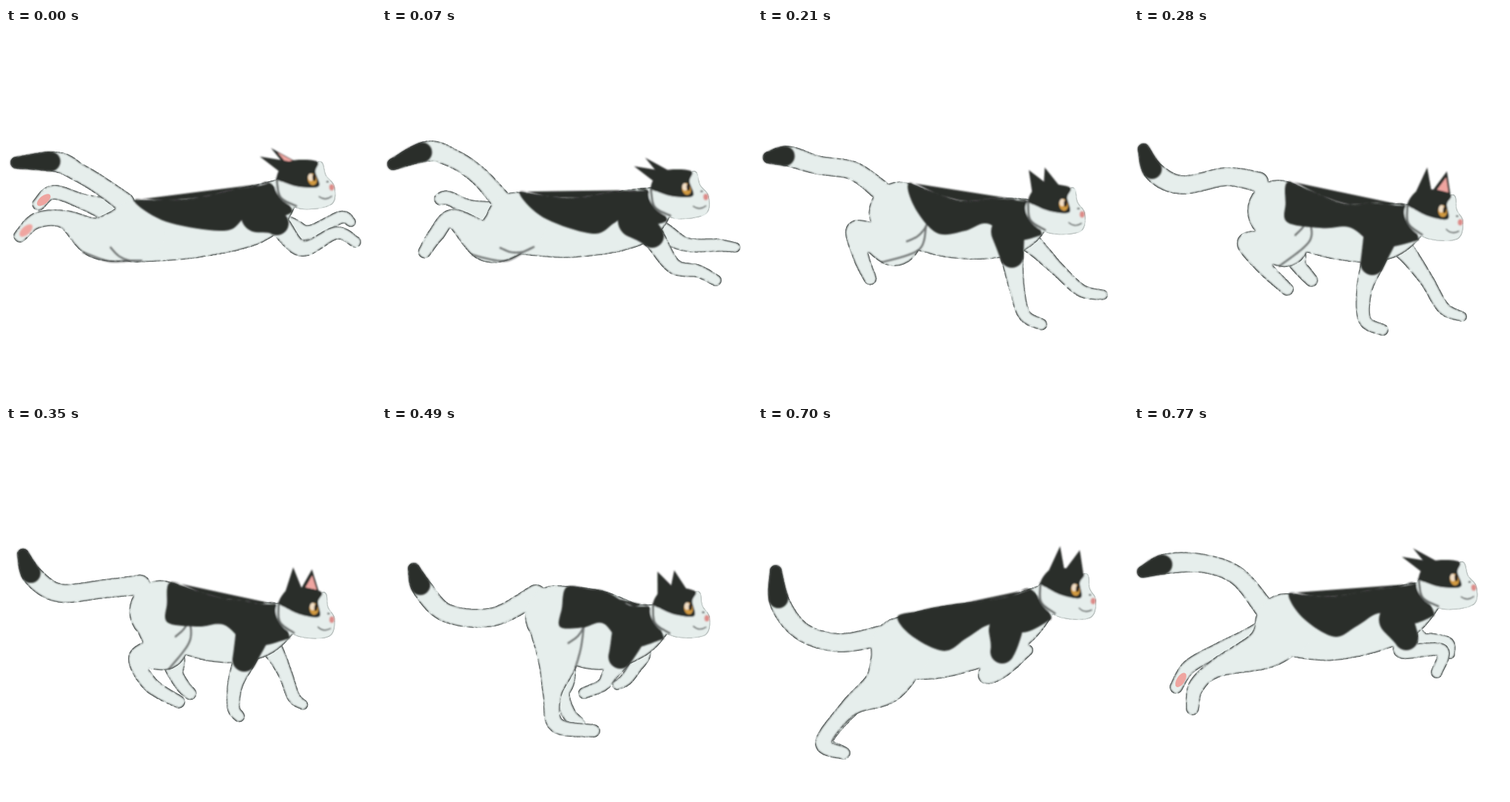
Animation of 500x500 px, one loop 0.84 s. Source, as an HTML page:

```html
<!DOCTYPE html>
<html lang="en">
<head>
<meta charset="utf-8">
<title>Running cat</title>
<style>
  html, body { margin: 0; width: 100%; height: 100%; overflow: hidden; background: #fff; }
  svg { display: block; width: 100vw; height: 100vh; }
  .line { fill: none; stroke: #4a4e4d; stroke-linecap: round; stroke-linejoin: round; }
  .fur { fill: #e6eeec; }
  .dark { fill: #2b2d2c; }
  .pink { fill: #efa5a0; }
</style>
</head>
<body>
<svg id="stage" viewBox="0 0 500 500" xmlns="http://www.w3.org/2000/svg">
  <defs>
    <!-- Shades the inner rim of a shape like a soft pencil line -->
    <filter id="rim" filterUnits="userSpaceOnUse" x="0" y="0" width="500" height="500" color-interpolation-filters="sRGB">
      <feMorphology in="SourceAlpha" operator="erode" radius="1.4"/>
      <feGaussianBlur stdDeviation="1.3" result="core"/>
      <feTurbulence type="fractalNoise" baseFrequency=".13" numOctaves="3" seed="4"/>
      <feColorMatrix values="0 0 0 0 .2  0 0 0 0 .22  0 0 0 0 .215  3 0 0 0 -.6" result="grain"/>
      <feComposite in="grain" in2="SourceAlpha" operator="in"/>
      <feComposite in2="core" operator="out" result="edge"/>
      <feMerge><feMergeNode in="SourceGraphic"/><feMergeNode in="edge"/></feMerge>
    </filter>
    <filter id="soft" filterUnits="userSpaceOnUse" x="0" y="0" width="500" height="500">
      <feGaussianBlur stdDeviation=".8"/>
    </filter>
  </defs>
</svg>
<script>
const STEP = 70, STEPS = 12;

// Joints of the key poses. Spine: hip, waist, shoulder, neck. Legs run from the body to the toe.
const poses = [
  { at: 0, ears: 1, pink: 1, belly: 40, dip: .48, haunch: 1, nose: '444,214',
    spine: '175,275 255,271 335,252 375,224', tail: '160,236 128,213 98,195 68,181 14,182',
    hindN: '125,284 80,259 42,260 19,281', hindF: '140,248 105,235 64,222 44,238',
    foreN: '366,264 400,298 446,277 472,289', foreF: '385,270 410,276 452,256 466,262' },
  { at: 2, ears: 1, pink: 0, belly: 40, dip: .4, haunch: 1, nose: '439,240',
    spine: '188,252 258,270 338,262 375,247', tail: '160,228 132,185 95,158 55,152 16,186',
    hindN: '163,293 112,256 104,298 96,324', hindF: '155,255 130,250 115,238 114,224',
    foreN: '364,298 388,345 408,380 430,393', foreF: '375,283 412,309 455,331 489,331' },
  { at: 4, ears: 0, pink: 1, belly: 38, dip: .09, haunch: 1, nose: '445,262',
    spine: '195,247 275,275 335,275 380,260', tail: '168,208 125,201 65,212 28,195 13,164',
    hindN: '205,295 152,290 175,322 207,353', hindF: '215,300 222,320 232,332 240,341',
    foreN: '322,318 311,355 312,395 336,408', foreF: '365,300 395,340 418,378 443,390' },
  { at: 7, ears: .4, pink: 0, belly: 54, dip: .09, haunch: 1, nose: '443,259',
    spine: '235,257 285,275 335,278 374,262', tail: '208,228 150,258 88,253 55,220 43,193',
    hindN: '238,312 230,362 236,404 286,412', hindF: '245,335 243,362 252,388 266,402',
    foreN: '322,312 308,335 298,350 273,361', foreF: '350,305 342,325 330,342 318,350' },
  { at: 8, ears: 0, pink: 1, belly: 57, dip: .2, haunch: 0, nose: '457,234',
    spine: '196,304 248,288 322,272 384,234', tail: '160,303 105,307 62,285 32,238 13,208',
    hindN: '192,348 178,382 185,412 231,424', hindF: '222,350 213,378 232,412 253,418',
    foreN: '322,328 314,355 298,373 272,383', foreF: '345,305 348,340 338,370 319,392' },
  { at: 10, ears: 0, pink: 0, belly: 48, dip: .33, haunch: 0, nose: '457,236',
    spine: '194,300 250,292 335,270 387,235', tail: '168,283 110,293 60,278 30,240 24,196',
    hindN: '172,348 124,380 88,428 116,442', hindF: '165,345 126,382 92,425 112,440',
    foreN: '330,305 308,337 330,332 364,303', foreF: '350,300 335,322 345,320 362,302' },
  { at: 11, ears: 1, pink: 0, belly: 43, dip: .33, haunch: 0, nose: '463,217',
    spine: '205,268 270,274 350,256 398,230', tail: '175,245 140,203 95,186 45,186 12,197',
    hindN: '178,300 112,327 84,352 79,382', hindF: '160,288 118,302 75,325 57,353',
    foreN: '368,287 364,304 416,303 409,333', foreF: '385,290 405,290 424,294 427,308' }
];

// Half widths at the joints
const girth = {
  tail: [14, 13, 13, 14, 8],
  hind: [40, 28, 13, 11, 9], hindFar: [24, 17, 11, 10, 9],
  fore: [24, 16, 11, 9, 8], foreFar: [20, 14, 10, 9, 7]
};

// Head outline, relative to the nose
const head = {
  face: '-27,-33 -14,-34 -10,-16 0,0 -6,24 -46,27 -74,10 -77,-17',
  cap: '-77,-18 -66,-36 -45,-40 -20,-35 -24,-22 -21,-2 -46,-3 -67,-11',
  neck: '-77,-17 -74,8 -54,22'
};

const points = s => s.split(' ').map(p => p.split(',').map(Number));
const mix = (a, b, k) => a + (b - a) * k;
const mixPts = (a, b, k) => a.map((p, i) => p.map((v, j) => mix(v, b[i][j], k)));

function poseAt(step) {
  const i = poses.findLastIndex(p => p.at <= step);
  const a = poses[i], b = poses[(i + 1) % poses.length];
  const k = (step - a.at) / ((b.at || STEPS) - a.at);
  const out = {};
  for (const key in a) {
    out[key] = typeof a[key] === 'number' ? mix(a[key], b[key], k) : mixPts(points(a[key]), points(b[key]), k);
  }
  return out;
}

// Point on a Catmull-Rom spline, t from 0 to 1, in any number of dimensions
function spline(pts, t) {
  const n = pts.length - 1, i = Math.min(n - 1, Math.floor(t * n)), u = t * n - i;
  const [p, q, r, s] = [-1, 0, 1, 2].map(k => pts[Math.max(0, Math.min(n, i + k))]);
  return q.map((v, j) => v + u / 2 * (r[j] - p[j] +
    u * (2 * p[j] - 5 * v + 4 * r[j] - s[j] + u * (3 * (v - r[j]) + s[j] - p[j]))));
}

function curve(pts, closed) {
  const ring = closed ? [pts.at(-1), ...pts, pts[0], pts[1]] : pts;
  const n = ring.length - 1, [a, b] = closed ? [1 / n, 1 - 1 / n] : [0, 1];
  const steps = pts.length * 10;
  return 'M' + Array.from({ length: steps + 1 }, (_, i) =>
    spline(ring, mix(a, b, i / steps)).map(v => v.toFixed(1))).join('L') + (closed ? 'Z' : '');
}

const poly = pts => 'M' + pts.join('L') + 'Z';
const limb = (joints, widths) => joints.map((p, i) => [...p, widths[i]]);

// A limb is a chain of overlapping discs.
function tube(joints, from = 0, to = 1) {
  let d = '';
  for (let i = 0, n = 90; i <= n; i++) {
    const [x, y, r] = spline(joints, mix(from, to, i / n)).map(v => +v.toFixed(1));
    d += `M${x - r},${y}a${r},${r} 0 1 1 ${2 * r},0a${r},${r} 0 1 1 ${-2 * r},0`;
  }
  return d;
}

// Point beside a limb: t along it, s half widths to its left, turned by angle about the joint
function beside(joints, t, s, angle = 0) {
  const [x, y, r] = spline(joints, t);
  const a = spline(joints, Math.max(0, t - .01)), b = spline(joints, Math.min(1, t + .01));
  const dir = Math.atan2(b[1] - a[1], b[0] - a[0]) - Math.PI / 2 - angle;
  return [x + Math.cos(dir) * r * s, y + Math.sin(dir) * r * s];
}

const path = (d, cls, more = '') => `<path class="${cls}" d="${d}" ${more}/>`;
const group = (filter, html) => `<g filter="url(#${filter})">${html}</g>`;
const furry = (...shapes) => group('rim', shapes.map(d => path(d, 'fur')).join(''));
const oval = (x, y, rx, ry, fill, turn = 0) =>
  `<ellipse cx="${x}" cy="${y}" rx="${rx}" ry="${ry}" fill="${fill}" transform="rotate(${turn} ${x} ${y})"/>`;

// Dark saddle: follows the back, dips over the flank, rises, then falls over the shoulder.
function saddle(body, dip) {
  const rise = .35 + dip * .75;
  const top = Array.from({ length: 20 }, (_, i) => beside(body, i / 20, 1.01));
  const under = [[.95, 1], [.95, -.9], [.88, -.95], [mix(rise, .93, .4), -.5], [rise, .2],
    [mix(dip, rise, .5), -.02], [dip, -.25], [dip * .4, .3], [0, 1]].map(([t, s]) => beside(body, t, s));
  return poly(top) + curve([...under, ...top.slice(1, 19).filter((_, i) => i % 4 === 3)], true);
}

// The sole shows when a foot trails far behind the hip.
function pad(leg) {
  const [hip, , , heel, toe] = leg;
  if (hip[0] - toe[0] < 129) return '';
  const turn = Math.atan2(toe[1] - heel[1], toe[0] - heel[0]) * 180 / Math.PI;
  return oval(mix(heel[0], toe[0], .65), mix(heel[1], toe[1], .65), 11, 5.5, '#efa5a0', turn);
}

function ears({ ears: back, pink }) {
  const rear = [[mix(-55, -97, back), mix(-69, -49, back)], [-46, -36], [-71, -25]];
  const front = [[mix(-28, -81, back), mix(-66, -59, back)], [mix(-20, -42, back), -33], [mix(-46, -66, back), -37]];
  const [cx, cy] = [0, 1].map(j => (front[0][j] + front[1][j] + front[2][j]) / 3);
  const inner = front.map(([x, y]) => [mix(cx, x, .6) + 1, mix(cy, y, .6)]);
  return path(poly(front), 'dark') + (pink > .5 ? path(poly(inner), 'pink') : '') + path(poly(rear), 'dark');
}

const features =
  oval(-29, -12, 6, 8, '#d29a40', -10) +
  oval(-31, -15, 3.6, 5, '#f3dfc6') +
  oval(-26.5, -14, 2.2, 4.6, '#2a211b') +
  oval(-4, 1, 3.4, 4.4, '#dd8c89') +
  path('M-22,12q8,7 17,1', 'line', 'stroke-width="1.6"') +
  oval(-9, -7, 1.8, 1.3, '#4a4e4d');

function draw(step) {
  const p = poseAt(step), [hip, , shoulder] = p.spine;
  const body = limb(p.spine, [42, p.belly, 39, 21]);
  const tail = limb(p.tail, girth.tail);
  const hindN = limb([hip, ...p.hindN], girth.hind), hindF = limb([hip, ...p.hindF], girth.hindFar);
  const foreN = limb([shoulder, ...p.foreN], girth.fore), foreF = limb([shoulder, ...p.foreF], girth.foreFar);
  const thigh = [1.2, .8, .4, 0].map(a => beside(hindN, 0, 1, -a))
    .concat([.1, .2, .3].map(t => beside(hindN, t, 1)));
  // The head lowers as the ears fold back.
  const place = `transform="translate(${p.nose[0]}) rotate(${mix(5, -5, p.ears)})"`;
  const face = curve(points(head.face), true);

  return furry(tube(hindF)) + pad(hindF) + furry(tube(foreF)) +
    group('rim', [tail, body, hindN, foreN].map(j => path(tube(j), 'fur')).join('') + path(face, 'fur', place)) +
    group('soft',
      path(curve(thigh), 'line', `stroke-width="2.6" opacity="${.75 * p.haunch}"`) + pad(hindN) +
      path(tube(tail, .79), 'dark') + path(saddle(body, p.dip), 'dark') + path(tube(foreN, .06, .25), 'dark') +
      `<g ${place}>` + path(face, 'fur') + path(curve(points(head.neck)), 'line', 'stroke-width="3" opacity=".8"') +
      ears(p) + path(curve(points(head.cap), true), 'dark') + features + '</g>');
}

const stage = document.getElementById('stage');
const cels = Array.from({ length: STEPS }, (_, step) => {
  const g = document.createElementNS(stage.namespaceURI, 'g');
  g.innerHTML = draw(step);
  g.style.display = step ? 'none' : '';
  return stage.appendChild(g);
});

let shown = 0, start;
function tick(now) {
  start ??= now;
  const step = Math.floor(Math.max(0, now - start) / STEP) % STEPS;
  if (step !== shown) {
    cels[shown].style.display = 'none';
    cels[step].style.display = '';
    shown = step;
  }
  requestAnimationFrame(tick);
}
requestAnimationFrame(tick);
</script>
</body>
</html>
```
